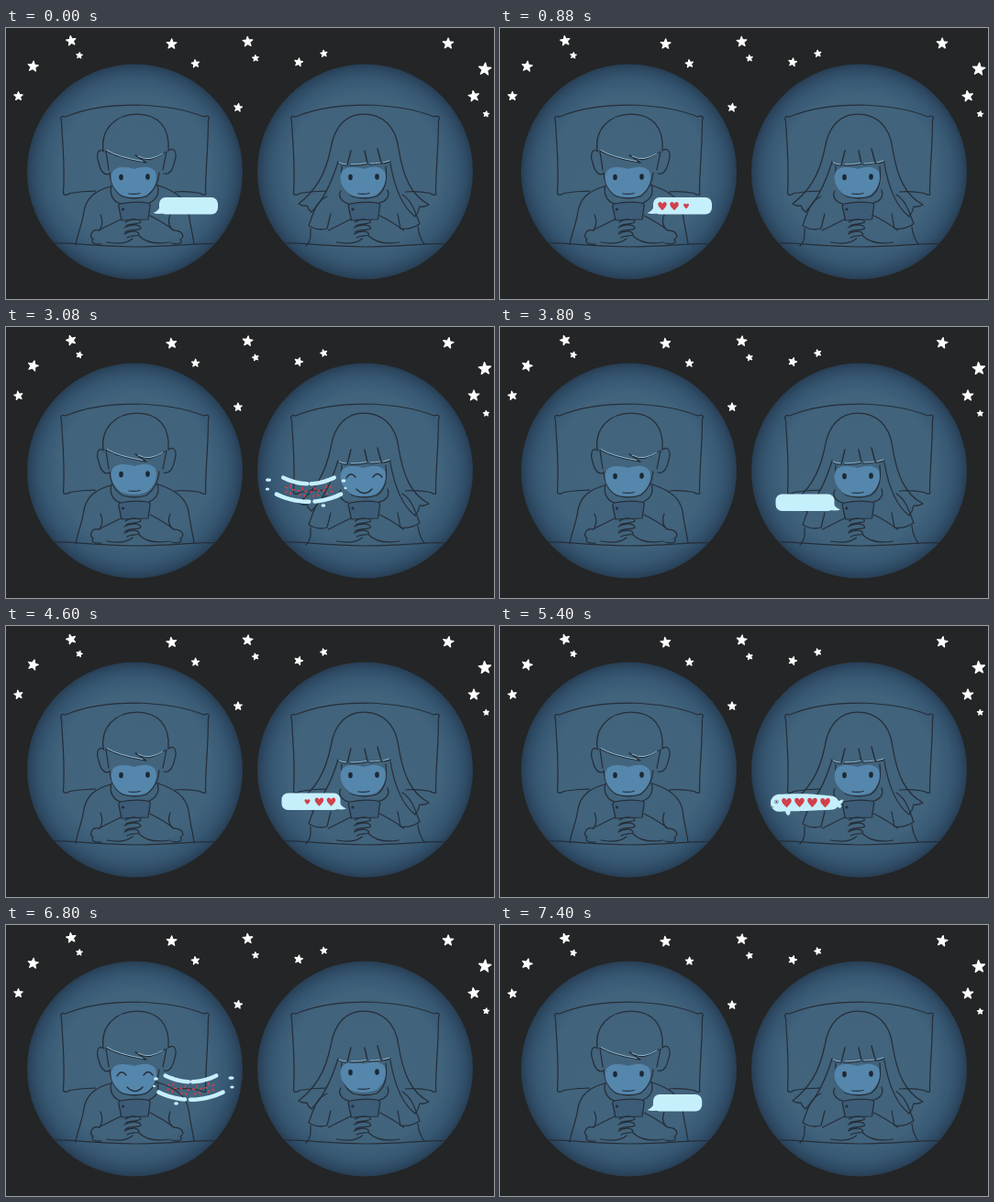
An HTML page with a canvas that plays this animation: 532 by 296 pixels, repeating every 7480 ms.

```html
<!DOCTYPE html>
<html>
<head>
<meta charset="utf-8">
<title>Goodnight messages</title>
<style>
html, body { margin: 0; width: 100%; height: 100%; overflow: hidden; background: #242526; }
canvas { display: block; width: 532px; height: 296px; }
</style>
</head>
<body>
<canvas id="stage"></canvas>
<script>
const W = 532, H = 296, LOOP = 7480, HALF = 3720, LEAD = 400;
const NIGHT = '#242526', LINE = '#252e38', SKIN = '#5586ac', SHINE = '#8fb9d3', FOAM = '#c6effc', RED = '#d0414b';
const canvas = document.getElementById('stage');
const g = canvas.getContext('2d');
const dpr = window.devicePixelRatio || 1;
canvas.width = W * dpr;
canvas.height = H * dpr;

const clamp = v => Math.max(0, Math.min(1, v));
const ramp = (t, a, b) => clamp((t - a) / (b - a));
const smooth = v => v * v * (3 - 2 * v);

// Eased interpolation through [position, value] pairs
function keyed(s, keys) {
  for (let i = 1; i < keys.length; i++) {
    const [a, va] = keys[i - 1], [b, vb] = keys[i];
    if (s <= b) return va + (vb - va) * smooth(ramp(s, a, b));
  }
  return keys[keys.length - 1][1];
}

function stroke(d, color = LINE, width = 1.25) {
  g.strokeStyle = color;
  g.lineWidth = width;
  g.stroke(new Path2D(d));
}

function fill(d, color) {
  g.fillStyle = color;
  g.fill(new Path2D(d));
}

function oval(x, y, rx, ry, color) {
  g.fillStyle = color;
  g.beginPath();
  g.ellipse(x, y, rx, ry, 0, 0, 7);
  g.fill();
}

function shifted(x, y, draw) {
  g.save();
  g.translate(x, y);
  draw();
  g.restore();
}

// x, y, radius
const STARS = [
  [13.5, 74.5, 4.8], [29.5, 42, 5.8], [71, 14, 5.4], [80, 30, 3.3], [180.5, 17.5, 5.6],
  [206.5, 39, 4.3], [253, 87, 4.5], [263.5, 15, 5.6], [272, 33, 3.4], [319, 37.5, 4.5],
  [346.5, 28, 3.7], [482, 17, 6], [522, 45, 7], [510, 74.5, 6], [523.5, 94, 3.1]
];

function drawStars(t) {
  const pose = Math.floor(t / 200) % 2;
  g.fillStyle = g.strokeStyle = '#fff';
  g.lineWidth = 1.3;
  STARS.forEach(([x, y, r], i) => {
    const turn = -Math.PI / 2 + 0.15 * Math.sin(i * 2.3) + pose * (i % 2 ? 0.16 : -0.16);
    g.beginPath();
    for (let k = 0; k < 10; k++) {
      const a = turn + k * Math.PI / 5, d = k % 2 ? r * 0.42 : r;
      g.lineTo(x + d * Math.cos(a), y + pose * 0.5 + d * Math.sin(a));
    }
    g.closePath();
    g.fill();
    g.stroke();
  });
}

function drawRoom(cx) {
  const shade = g.createRadialGradient(cx, 153, 0, cx, 157, 117.5);
  shade.addColorStop(0, '#42647d');
  shade.addColorStop(0.7, '#41637c');
  shade.addColorStop(0.85, '#385974');
  shade.addColorStop(0.94, '#2f4c66');
  shade.addColorStop(1, '#273f55');
  g.save();
  oval(cx, 157, 117.5, 117.5, shade);
  g.clip();
  g.translate(cx - 140, 0);
  stroke('M62 180 C64 150 61 125 60 102 C58 98 60 95 64 97 C85 88 112 84 142 84 C172 85 196 89 215 97 C220 95 222 97 220 101 C220 130 217 155 217 180 M62 180 C62 183 66 183 69 180.5 Q82 178 97 178 M217 180 C219 183 214 183 211 180.5 Q198 178 184 179');
  stroke('M46 235 C70 234 90 238 140 239 C185 239 210 234 234 236');
  g.restore();
}

function drawPhone() {
  const d = 'M125 192 Q140 189 154 191 Q158 191 157 195 L155 209 L126 210 L123 196 Q122 193 125 192Z';
  fill(d, '#3c5c78');
  stroke(d);
  stroke('M125 209 C119 212 111 216 101 221 M157 205 C165 209 174 214 183 221');
  stroke('M130 212 C137 207 147 209 147 212 C143 215 136 213 131 216 M129 218 C137 213 148 215 147 219 C142 222 136 219 130 223 M129 225 C137 220 146 222 145 226 C140 228 136 226 132 229');
  stroke('M110 234 C121 236 131 236 138 230 M145 227 C153 235 166 236 178 234');
  oval(127.5, 198, 1.6, 1.6, LINE);
}

function drawFace(x, mood) {
  shifted(x, mood === 'up' ? -2 : 0, () => {
    fill('M116 157 C121 150 133 152 140 154 C148 151 158 150 163 157 C166 166 162 176 154 182 C146 186 133 186 125 182 C117 176 112 166 116 157Z', SKIN);
    if (mood === 'happy') {
      stroke('M121 165 Q126 157 131 164 M150 164 Q155 157 160 164', LINE, 1.4);
      stroke('M132 177 Q141 186 149 177', LINE, 1.4);
    } else {
      oval(125.5, 163, 2.3, 3.2, '#1d2832');
      oval(154.5, 162.5, 2.3, 3.2, '#1d2832');
      stroke('M134 181 Q140 182 146 180.5');
    }
  });
}

function drawBoy(mood) {
  stroke('M106 134 C103 111 119 94 143 94 C166 94 179 109 177 134 M177 134 C183 129 187 136 184 145 C182 155 178 161 172 159 M107 135 C100 130 98 139 101 147 C103 156 107 162 113 159');
  stroke('M109 135 L112 155 M175 135 L171 155 M113 158 C114 171 119 179 127 184 Q140 188 153 184 C161 178 166 170 167 158');
  stroke('M115 172 C112 181 117 190 125 192 M165 171 C168 182 163 188 156 191');
  stroke('M114 173 C97 178 88 185 85 200 C83 215 78 224 76 237 M166 172 C184 178 196 186 199 201 C201 217 204 227 205 236');
  stroke('M101 221 C94 219 90 227 95 231 C92 234 96 237 104 236 M183 221 C193 221 195 228 190 231 C194 235 187 237 180 235 M103 204 Q107 213 102 221 M179 204 Q175 213 181 220');
  drawFace(0, mood);
  stroke('M109 134 Q122 142 153 147 L141 139 Q151 144 157 143.5 Q166 141 173 136', LINE, 1.4);
  stroke('M110 133.5 Q122 141 149 145.5 M144 140 Q151 143.5 157 142.5 Q165 141 171 137', SHINE, 1);
  drawPhone();
}

function drawGirl(mood) {
  stroke('M319 192 C337 178 348 161 354 132 C358 106 372 94 390 94 C409 94 425 106 428 132 C433 163 442 183 461 193 Q456 196 451 195 Q450 201 446 206 C433 196 424 177 419 148 M319 192 Q323 195 328 194 Q329 198 333 201 C346 188 355 169 362 146');
  stroke('M366 151 C365 168 370 179 378 184 Q391 188 404 184 C412 179 416 168 414 151');
  stroke('M365 178 C361 184 367 191 374 192 M416 177 C419 185 413 190 407 191');
  stroke('M350 184 C338 189 335 202 330 216 Q340 222 350 219 L354 203 M432 182 C443 189 446 201 451 214 Q440 221 430 219 L427 203');
  stroke('M332 219 C332 226 333 232 327 238 M449 217 C450 226 453 232 456 236');
  drawFace(250, mood);
  stroke('M362 147 Q366 150 372 150 L376 134 M375 150 Q386 150 394 148 L391 134 M396 149 Q403 149 409 147 L405 132 M409 148 Q414 148 419 146', LINE, 1.4);
  stroke('M363 147 Q367 149 371 149 M376 149 Q386 149 393 147.5 M397 148 Q403 148 408 147 M411 147 L418 145', SHINE, 1);
  shifted(250.5, 0, drawPhone);
}

function drawHeart(x, y, size, turn = 0) {
  if (size <= 0) return;
  g.save();
  g.translate(x, y);
  g.rotate(turn);
  g.scale(size, size);
  fill('M0 5 C-3 2 -5 0 -5 -2 C-5 -5.5 -1 -5.5 0 -2.5 C1 -5.5 5 -5.5 5 -2 C5 0 3 2 0 5Z', RED);
  g.restore();
}

function drawBubble(n) {
  const w = 10 + 54 * ramp(n, -LEAD, 0);
  g.fillStyle = FOAM;
  g.beginPath();
  g.roundRect(167, 185, w, 18.5, Math.min(7, w / 2));
  g.fill();
  fill('M168 195 Q166 200 160.5 202 Q166 204 173 202Z', FOAM);
  for (let i = 0; i < 4; i++) {
    const start = 210 + 300 * i;
    drawHeart(177 + 13 * i, 194.5, smooth(ramp(n, start, start + 120)) * 0.95);
  }
}

// Body curve: y = c + b*u + q*u*u around the swimmer's middle
function spine(n) {
  const s = smooth(ramp(n, 1860, 2820));
  const x = 198 + 132 * s;
  const c = keyed(s, [[0, 194], [0.235, 193.5], [0.65, 167], [1, 181]]);
  const b = keyed(s, [[0, 0], [0.235, -0.3], [0.65, -0.02], [0.85, 0.18], [1, 0]]);
  const q = -0.0085 * Math.cos(2 * Math.PI * (s - 0.235) / 0.83) * ramp(n, 1500, 1900);
  return (u, off = 0) => {
    const a = Math.atan(b + 2 * q * u);
    return { x: x + u - off * Math.sin(a), y: c + b * u + q * u * u + off * Math.cos(a), a };
  };
}

function drawSwimmer(n) {
  const at = spine(n), m = smooth(ramp(n, 1500, 1800));
  const tail = -25 - 3 * m, head = 25 + 7 * m;
  const half = u => 9 + 0.7 * m - m * 3.7 * ramp(u, 0, -36);
  const flap = 0.25 * Math.sin(n / 90);
  const part = (u, off, d) => {
    const p = at(u, off);
    g.save();
    g.translate(p.x, p.y);
    g.rotate(p.a + flap);
    g.scale(m, m);
    fill(d, FOAM);
    stroke(d, '#6d9db5', 0.6);
    g.restore();
  };
  part(-34, 0, 'M2 -3 C-3 -3 -6 -8 -10 -6 Q-10 -1 -6 1 Q-10 5 -6 8 Q-1 7 2 3Z');
  part(20, 7, 'M-4 0 Q-6 8 -1 11 Q5 8 4 0Z');

  const side = dir => {
    for (let i = 0; i <= 24; i++) {
      const u = dir < 0 ? tail + (head - tail) * i / 24 : head + (tail - head) * i / 24;
      const p = at(u, dir * half(u));
      g.lineTo(p.x, p.y);
    }
  };
  const cap = (u, dir) => {
    for (let i = 1; i < 10; i++) {
      const k = i * Math.PI / 10;
      const p = at(u + dir * Math.sin(k) * 9, -dir * Math.cos(k) * half(u));
      g.lineTo(p.x, p.y);
    }
  };
  g.beginPath();
  side(-1);
  cap(head, 1);
  side(1);
  cap(tail, -1);
  g.closePath();
  g.fillStyle = FOAM;
  g.fill();

  for (let i = 0; i < 4; i++) {
    const p = at(-21 + i * 14, 0);
    drawHeart(p.x, p.y, 1 + 0.1 * m, p.a);
  }
  const eye = at(32, -1.5);
  oval(eye.x, eye.y, 3.4 * m, 3.4 * m, '#59717c');
  oval(eye.x, eye.y, 2.6 * m, 2.6 * m, '#eefcff');
  oval(eye.x, eye.y, 1.4 * m, 1.4 * m, '#26323a');
  const lip = at(39, 3);
  if (m > 0.5) stroke(`M${lip.x - 3} ${lip.y + 1} L${lip.x + 1} ${lip.y}`, '#59717c', 0.9);
}

function drawBurst(n) {
  const k = ramp(n, 2960, 3200), at = spine(n);
  const off = 7 + 5.5 * k, thick = 6.5 - 4 * k;
  const arc = (a, b, d) => {
    g.beginPath();
    for (let i = 0; i <= 10; i++) {
      const p = at(a + (b - a) * i / 10, d);
      g.lineTo(p.x, p.y);
    }
    g.strokeStyle = FOAM;
    g.lineWidth = thick;
    g.stroke();
  };
  const gap = 20 * k;
  arc(-32, -gap / 2 + 3, -off);
  arc(gap / 2 - 2, 32, -off);
  arc(-31, 2 - gap / 6, off);
  arc(4 + gap / 6, 31, off);
  const dot = (x, y, rx, ry) => oval(330 + x * (0.7 + 0.6 * k), 178 + y * (0.7 + 0.6 * k), rx * (1.5 - k), ry * (1.5 - k), FOAM);
  dot(-44, -11, 3, 1.8);
  dot(-45, -1, 2.2, 1.6);
  dot(16, 17, 2.4, 1.8);
  dot(38, -10, 2.4, 1.8);
  dot(40, -2, 1.5, 1.3);
  for (let i = 0; i < 4; i++) {
    const p = at(-21 + i * 14, 0);
    for (let j = 0; j < 5; j++) {
      const a = j * 1.257 + i, c = Math.cos(a), s = Math.sin(a);
      const r = 0.6 + 5 * k, e = r + 3 * (1 - k) + 0.8;
      stroke(`M${p.x + c * r} ${p.y + s * r} L${p.x + c * e} ${p.y + s * e}`, RED, 1.5);
    }
  }
}

function drawMessage(n) {
  if (n < 1500) drawBubble(n);
  else if (n < 2960) drawSwimmer(n);
  else if (n < 3200) drawBurst(n);
}

function render(t) {
  const fromBoy = t < HALF - LEAD + 40 || t >= LOOP - LEAD;
  const n = fromBoy ? (t >= LOOP - LEAD ? t - LOOP : t) : t - HALF;
  const sender = n > 2640 ? 'up' : 'calm';
  const reader = n > 2840 ? 'happy' : 'calm';

  g.setTransform(dpr, 0, 0, dpr, 0, 0);
  g.lineCap = g.lineJoin = 'round';
  g.fillStyle = NIGHT;
  g.fillRect(0, 0, W, H);
  drawStars(t);
  drawRoom(140.5);
  drawRoom(391.5);
  drawBoy(fromBoy ? sender : reader);
  drawGirl(fromBoy ? reader : sender);

  g.save();
  if (!fromBoy) {
    g.translate(531.5, -2.5 * (1 - ramp(n, 1500, 1900)));
    g.scale(-1, 1);
  }
  drawMessage(n);
  g.restore();
}

const start = performance.now();
function tick() {
  const t = (performance.now() - start) % LOOP;
  render(Math.floor(t / 40) * 40);
  requestAnimationFrame(tick);
}
tick();
</script>
</body>
</html>
```
